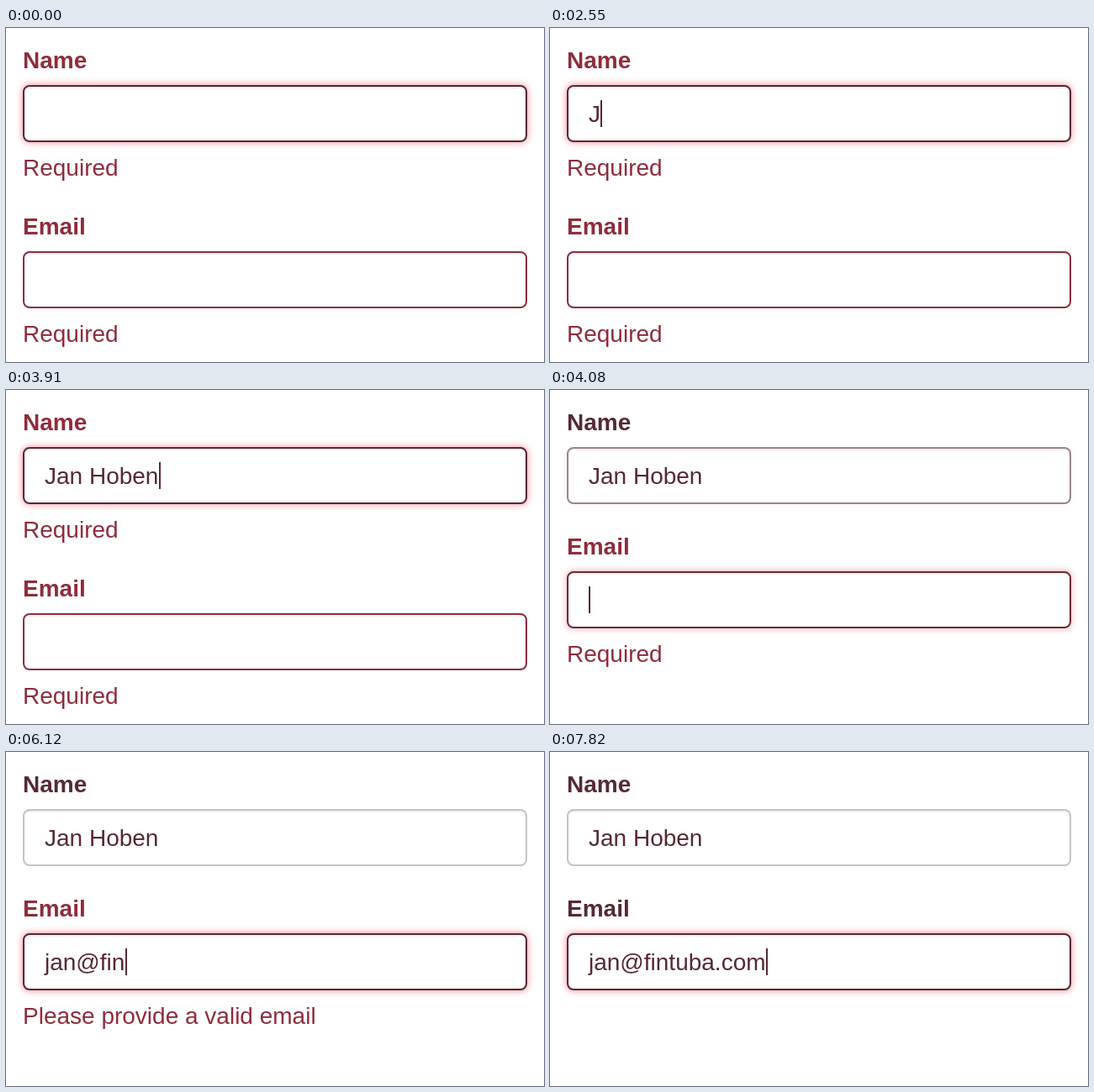
An HTML page that plays this animation: 640 by 398 pixels, repeating every 7990 ms.

```html
<!DOCTYPE html>
<html lang="en">
<head>
<meta charset="utf-8">
<title>Form validation</title>
<style>
  html, body { margin: 0; width: 100%; height: 100%; overflow: hidden; background: #fff; }
  svg { display: block; width: 100%; height: 100%; }
  text { font: 28px "Liberation Sans", Arial, sans-serif; white-space: pre; }
  .label { font-weight: bold; }
</style>
</head>
<body>
<svg id="stage" viewBox="0 0 640 398" xmlns="http://www.w3.org/2000/svg">
  <defs>
    <filter id="blur" filterUnits="userSpaceOnUse" x="0" y="40" width="640" height="120">
      <feGaussianBlur stdDeviation="4.5"/>
    </filter>
  </defs>
</svg>
<script>
const LOOP = 7990, TICK = 170;
const RED = [143, 44, 60], DARK = [86, 41, 51], GREY = [196, 196, 196];
const NAME = "Jan Hoben", EMAIL = "jan@fintuba.com";

// Ticks at which each key lands
const NAME_KEYS = [15, 17, 18, 19, 20, 21, 21, 22, 23];
const EMAIL_KEYS = [29, 30, 31, 33, 34, 35, 36, 37, 39, 40, 41, 42, 43, 44, 45];
const SWITCH = 24, INVALID = 33, VALID = 46;

const stage = document.getElementById("stage");
const rgb = c => `rgb(${c.join()})`;
const mix = (a, b, p) => a.map((v, i) => Math.round(v + (b[i] - v) * p));
const typed = (text, keys, n) => text.slice(0, keys.filter(k => k <= n).length);

function add(parent, tag, attrs, text) {
  const el = document.createElementNS("http://www.w3.org/2000/svg", tag);
  for (const k in attrs) el.setAttribute(k, attrs[k]);
  if (text) el.textContent = text;
  return parent.appendChild(el);
}

function makeField(title) {
  const g = add(stage, "g", {});
  const box = { x: 20, y: 68, width: 600, height: 68, rx: 8 };
  const inner = { x: 21, y: 69, width: 598, height: 66, rx: 7 };
  const label = add(g, "text", { x: 20, y: 48, class: "label" }, title);
  const glow = add(g, "rect", { ...box, fill: "#ee7f8d", filter: "url(#blur)" });
  add(g, "rect", { ...inner, fill: "#fff" });
  add(g, "path", { d: "M24 71H616", stroke: "#000", "stroke-opacity": .06, "stroke-width": 2 });
  const border = add(g, "rect", { ...inner, fill: "none", "stroke-width": 2 });
  const value = add(g, "text", { x: 46, y: 112, fill: rgb(DARK) });
  const caret = add(g, "rect", { y: 86, width: 2, height: 32, fill: rgb(DARK) });
  const help = add(g, "text", { x: 20, y: 176, fill: rgb(RED) });

  return s => {
    g.setAttribute("transform", `translate(0 ${s.y})`);
    label.setAttribute("fill", rgb(s.label));
    glow.setAttribute("opacity", s.glow);
    border.setAttribute("stroke", rgb(s.border));
    value.textContent = s.value;
    help.textContent = s.help;
    const end = s.value ? value.getComputedTextLength() : 0;
    caret.setAttribute("x", Math.ceil(46 + end));
    caret.setAttribute("opacity", s.caret ? 1 : 0);
  };
}

const nameField = makeField("Name");
const emailField = makeField("Email");

function draw(time) {
  const n = Math.floor(time / TICK);
  const moved = n >= SWITCH;
  const fading = n === SWITCH;
  const fade = !moved ? 0 : fading ? .6 : 1;

  nameField({
    y: 0,
    label: moved ? DARK : RED,
    border: mix(DARK, GREY, fade),
    glow: !moved ? 1 : fading ? .1 : 0,
    value: typed(NAME, NAME_KEYS, n),
    help: moved ? "" : "Required",
    caret: !moved && (n >= 13 || (n >= 2 && n < 5) || (n >= 8 && n < 11))
  });

  emailField({
    y: moved ? 148 : 198,
    label: n >= VALID ? DARK : RED,
    border: mix(RED, DARK, fade),
    glow: !moved ? 0 : fading ? .7 : 1,
    value: typed(EMAIL, EMAIL_KEYS, n),
    help: n >= VALID ? "" : n >= INVALID ? "Please provide a valid email" : "Required",
    caret: moved && n !== 27 && n !== 28
  });
}

const start = performance.now();
function frame() {
  draw((performance.now() - start) % LOOP);
  requestAnimationFrame(frame);
}
frame();
</script>
</body>
</html>
```
